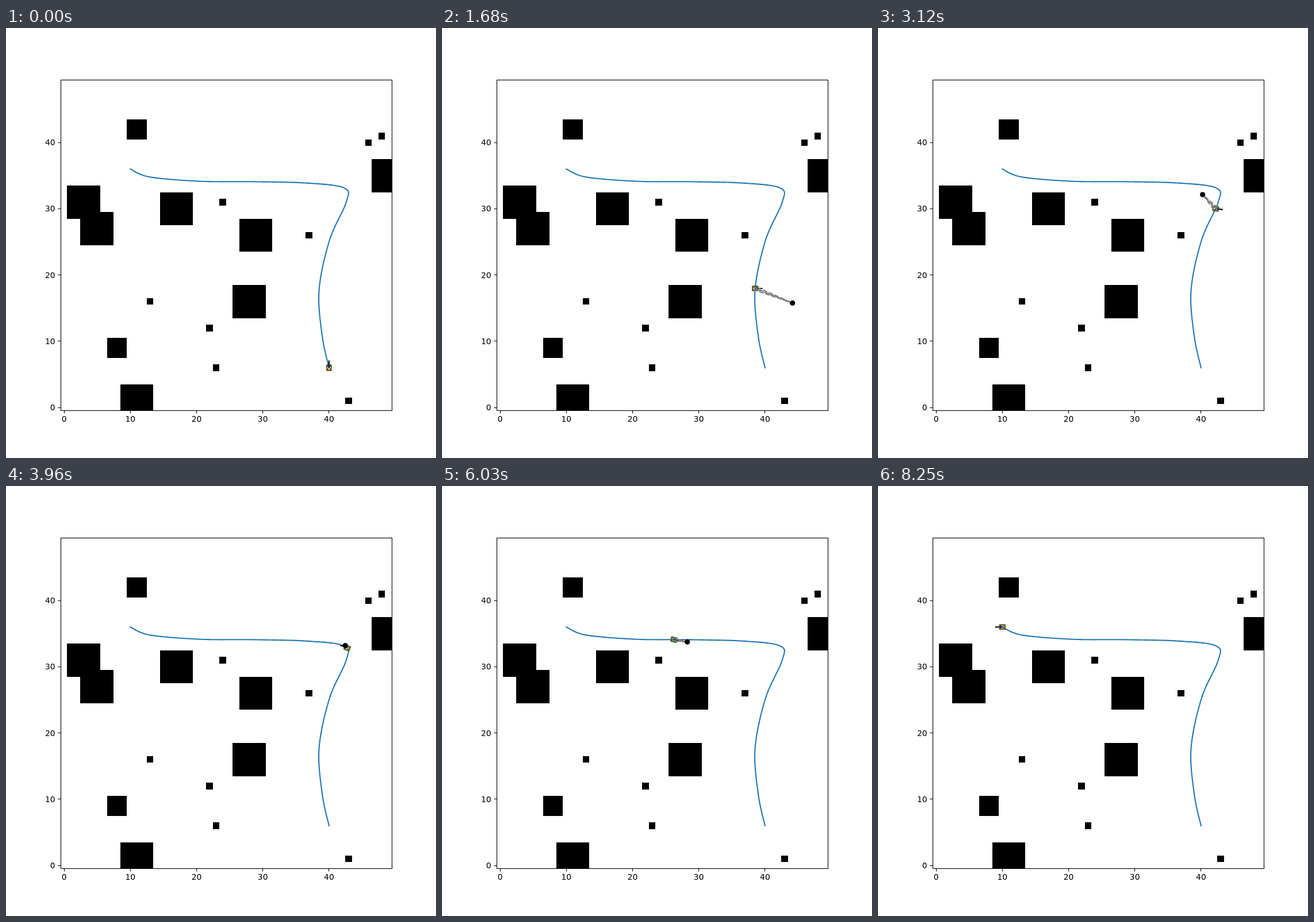
These frames come from a looping animation (748x748 px, 8.28 s). An HTML page with a canvas:

```html
<!DOCTYPE html>
<html lang="en">
<head>
<meta charset="utf-8">
<title>Robot path</title>
<style>
html, body { margin: 0; width: 100%; height: 100%; overflow: hidden; background: #fff; }
canvas { display: block; }
</style>
</head>
<body>
<canvas id="stage" width="748" height="748"></canvas>
<script>
const ctx = document.getElementById('stage').getContext('2d');
const STEP = 30, STEPS = 276, UNIT = 11.519;
const px = x => 101.13 + x * UNIT;
const py = y => 660.04 - y * UNIT;
const rad = deg => deg * Math.PI / 180;

// Obstacles: side in cells, then the centre cells
const blocks = {
  1: [[24, 31], [37, 26], [13, 16], [22, 12], [23, 6], [43, 1], [46, 40], [48, 41]],
  3: [[11, 42], [8, 9]],
  5: [[3, 31], [5, 27], [17, 30], [29, 26], [28, 16], [11, 1], [49, 35]]
};

// Evenly timed poses: x, y, heading, turning-centre direction, signed inverse distance
const poses = [
  [40, 6, 90, 8, 0],
  [38.98, 10.76, 61, 23, .0103],
  [38.5, 17.7, 2, -20, .0145],
  [40.08, 25.26, -43, -51, .0025],
  [42.6, 31, 15, -46, -.05],
  [42.31, 33.13, 195, -55, -.22],
  [36.9, 33.87, 328, -70, -.25],
  [28.73, 34.09, 353, -3, .01],
  [20.74, 34.15, 313, -43, .058],
  [13, 34.79, 240, -10, .055],
  [10, 36, 180, 95, 0]
];

// Catmull-Rom spline over the poses, progress 0 to 1
function poseAt(progress) {
  const last = poses.length - 1;
  const i = Math.min(last - 1, Math.floor(progress * last));
  const u = progress * last - i, w = 1 - u;
  const [p, a, b, n] = [i - 1, i, i + 1, i + 2]
    .map(j => poses[Math.max(0, Math.min(last, j))]);
  return a.map((v, c) => v * w * w * (1 + 2 * u) + b[c] * u * u * (3 - 2 * u) +
    u * w * (w * (b[c] - p[c]) - u * (n[c] - v)) / 2);
}

function stroke(color, width, x0, y0, x1, y1) {
  ctx.strokeStyle = color;
  ctx.lineWidth = width;
  ctx.beginPath();
  ctx.moveTo(x0, y0);
  ctx.lineTo(x1, y1);
  ctx.stroke();
}

function drawMap() {
  ctx.fillStyle = '#000';
  for (const size in blocks)
    for (const [x, y] of blocks[size]) {
      const half = size / 2;
      const l = Math.floor(px(x - half)), r = Math.floor(px(x + half));
      const t = Math.round(py(y + half)), b = Math.round(py(y - half));
      ctx.fillRect(l, t, r - l, b - t);
    }
}

function drawRoute() {
  ctx.strokeStyle = '#1f77b4';
  ctx.lineWidth = 2.08;
  ctx.lineCap = 'square';
  ctx.lineJoin = 'round';
  ctx.beginPath();
  for (let i = 0; i < STEPS; i++) {
    const [x, y] = poseAt(i / (STEPS - 1));
    ctx.lineTo(px(x), py(y));
  }
  ctx.stroke();
}

function drawAxes() {
  ctx.lineCap = 'butt';
  ctx.strokeStyle = ctx.fillStyle = '#000';
  ctx.lineWidth = 1.11;
  ctx.strokeRect(95.5, 90.5, 576, 575);
  ctx.font = '13.89px "DejaVu Sans", sans-serif';
  for (let v = 0; v <= 40; v += 10) {
    const x = Math.floor(px(v)) + .5, y = Math.floor(py(v)) + .5;
    stroke('#000', 1.11, x, 665.5, x, 670.5);
    stroke('#000', 1.11, 90.5, y, 95.5, y);
    ctx.textAlign = 'center';
    ctx.fillText(v, px(v), 685);
    ctx.textAlign = 'right';
    ctx.fillText(v, 85.6, Math.round(py(v) + 5));
  }
}

const wheels = [[-3.5, -2], [-3.5, 2], [3.5, -2], [3.5, 2]];

function drawRobot(x, y, turn) {
  ctx.save();
  ctx.translate(x, y);
  ctx.rotate(-turn);
  ctx.lineCap = 'square';
  stroke('#000', 2.08, 0, 0, UNIT, 0);
  ctx.lineCap = 'butt';
  ctx.strokeStyle = '#008000';
  ctx.lineWidth = 2.08;
  ctx.strokeRect(-4.6, -3.7, 9.2, 7.4);
  for (const [u, v] of wheels) stroke('#f00', 2.08, u - 2, v, u + 2, v);
  stroke('#00f', 2.08, 3.5, -2, 3.5, 2);
  ctx.restore();
}

function drawPivot(x, y, turn, angle, curve) {
  if (!curve) return;
  const reach = Math.sign(curve) * Math.min(2000, 1 / Math.abs(curve));
  const cx = x + reach * Math.cos(angle), cy = y - reach * Math.sin(angle);
  const c = Math.cos(turn), s = Math.sin(turn);
  ctx.lineCap = 'butt';
  ctx.setLineDash([7.7, 3.33]);
  for (const [u, v] of wheels)
    stroke('#808080', 2.08, x + u * c + v * s, y - u * s + v * c, cx, cy);
  ctx.setLineDash([]);
  ctx.fillStyle = '#000';
  ctx.beginPath();
  ctx.arc(cx, cy, 4.6, 0, 2 * Math.PI);
  ctx.fill();
}

function draw(now) {
  const step = Math.floor(now / STEP) % STEPS;
  const [x, y, heading, angle, curve] = poseAt(step / (STEPS - 1));
  ctx.fillStyle = '#fff';
  ctx.fillRect(0, 0, 748, 748);
  ctx.save();
  ctx.beginPath();
  ctx.rect(95, 90, 577, 576);
  ctx.clip();
  drawMap();
  drawRoute();
  drawRobot(px(x), py(y), rad(heading));
  drawPivot(px(x), py(y), rad(heading), rad(angle), curve);
  ctx.restore();
  drawAxes();
}

const start = performance.now();
function loop() {
  draw(performance.now() - start);
  requestAnimationFrame(loop);
}
loop();
</script>
</body>
</html>
```
